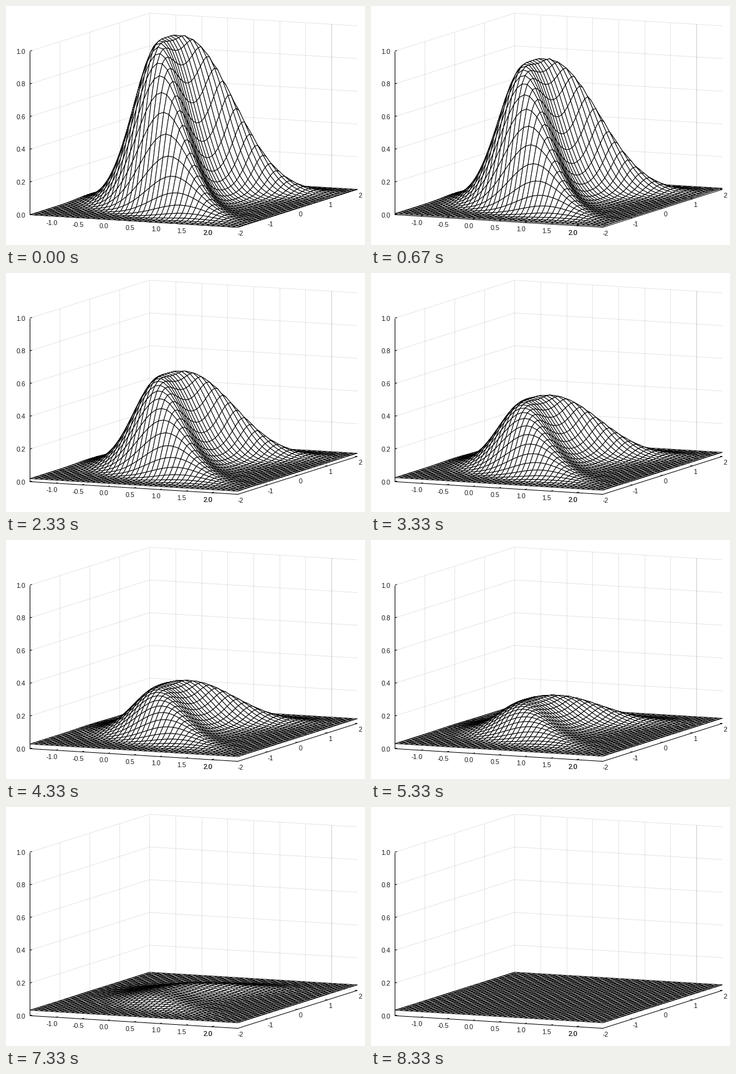
Animation of 576 by 384 pixels, one loop 8.41 s. Source, as a matplotlib script:

```python
import numpy as np
import matplotlib.pyplot as plt
from matplotlib.animation import FuncAnimation
from matplotlib.collections import LineCollection, PolyCollection

W, H, DPI = 576, 384, 96
FRAMES, LOOP_MS = 101, 8410
FLOOR = 0.0925

# Parallel projection: origin and the screen vectors of the full axes
ORIGIN = np.array([38.4, 335.3])
X_VEC = np.array([333.5, 20.3])
Y_VEC = np.array([191.8, -60.9])
Z_VEC = np.array([0, -262.8])
X_MIN, X_MAX, Y_MIN, Y_MAX = -1.5, 2.5, -2, 2

plt.rcParams["font.family"] = "Liberation Sans"


def project(x, y, z):
    u = np.asarray((x - X_MIN) / (X_MAX - X_MIN))[..., None]
    v = np.asarray((y - Y_MIN) / (Y_MAX - Y_MIN))[..., None]
    return ORIGIN + u * X_VEC + v * Y_VEC + np.asarray(z)[..., None] * Z_VEC


def unit(vec):
    return vec / np.hypot(*vec)


fig = plt.figure(figsize=(W / DPI, H / DPI), dpi=DPI, facecolor="white")
ax = fig.add_axes([0, 0, 1, 1])
ax.set(xlim=(0, W), ylim=(H, 0))
ax.axis("off")

x_ticks = np.arange(-1, 2.1, 0.5)
y_ticks = np.arange(-2, 3)
z_ticks = np.linspace(0, 1, 6)


def segment(p, q):
    return [project(*p), project(*q)]


def tick(pos, direction, length=3.5):
    return [pos, pos + length * unit(direction)]


def label(pos, text, dx, dy, ha="center"):
    ax.text(pos[0] + dx, pos[1] + dy, text, fontsize=8, color="#1c1c1c",
            ha=ha, va="center_baseline", zorder=4)


grid = []
axes_lines = [
    segment((X_MIN, Y_MIN, 0), (X_MIN, Y_MIN, 1)),
    segment((X_MIN, Y_MIN, 0), (X_MAX, Y_MIN, 0)),
    segment((X_MAX, Y_MIN, 0), (X_MAX, Y_MAX, 0)),
]

# The last x tick is drawn twice, so it looks heavier
for x in [*x_ticks, x_ticks[-1]]:
    grid.append(segment((x, Y_MAX, 0), (x, Y_MAX, 1)))
    pos = project(x, Y_MIN, 0)
    axes_lines.append(tick(pos, Y_VEC))
    label(pos, f"{x:.1f}", -6.5, 10.5)

for y in y_ticks:
    if y > Y_MIN:
        grid.append(segment((X_MIN, y, 0), (X_MIN, y, 1)))
    pos = project(X_MAX, y, 0)
    axes_lines.append(tick(pos, -X_VEC))
    label(pos, f"{y}", 4.3, 9.3)

for z in z_ticks:
    grid.append(segment((X_MIN, Y_MIN, z), (X_MIN, Y_MAX, z)))
    grid.append(segment((X_MIN, Y_MAX, z), (X_MAX, Y_MAX, z)))
    pos = project(X_MIN, Y_MIN, z)
    axes_lines.append(tick(pos, Y_VEC))
    label(pos, f"{z:.1f}", -7, 0.3, ha="right")

ax.add_collection(LineCollection(grid, colors=[(0, 0, 0, 0.1)],
                                 linewidths=0.75, zorder=1))
ax.add_collection(LineCollection(axes_lines, colors="black",
                                 linewidths=0.75, zorder=2))

# Rows run from the far side to the near side, so near cells hide far ones
gx, gy = np.meshgrid(np.linspace(X_MIN, X_MAX, 41),
                     np.linspace(Y_MAX, Y_MIN, 41))
bump = np.exp(-gx**2 - (gx - gy**2)**2)

mesh = PolyCollection([], facecolors="white", edgecolors="black",
                      linewidths=0.72, joinstyle="round", zorder=3)
ax.add_collection(mesh)


def update(i):
    s = i / (FRAMES - 1)
    height = np.exp(-s) * ((1 - s) * bump + s * FLOOR)
    p = project(gx, gy, height)
    cells = np.stack([p[:-1, :-1], p[:-1, 1:], p[1:, 1:], p[1:, :-1]], axis=2)
    mesh.set_verts(cells.reshape(-1, 4, 2))
    return [mesh]


anim = FuncAnimation(fig, update, frames=FRAMES, interval=LOOP_MS / FRAMES,
                     init_func=lambda: update(0), repeat=True, repeat_delay=0)
plt.show()
```
